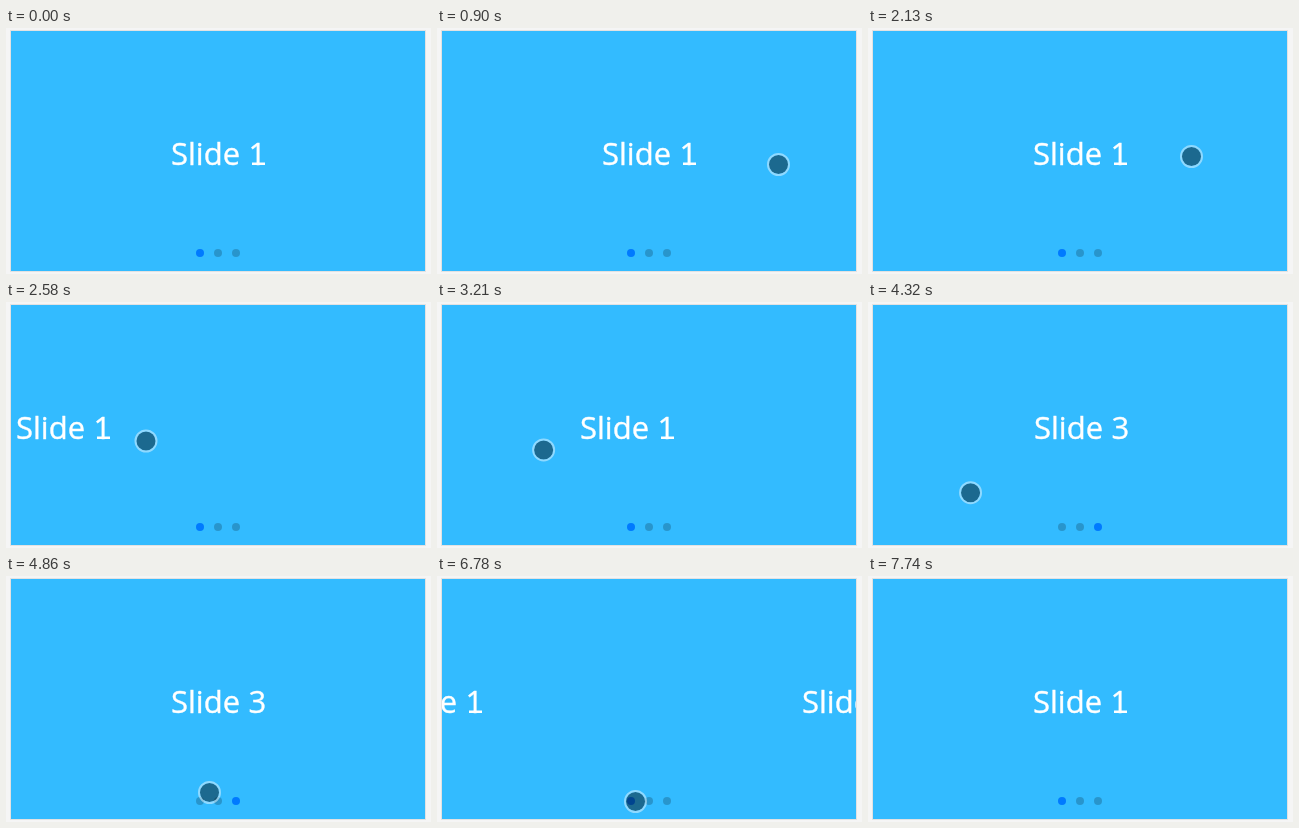
Write an HTML page with a canvas that moves like this. It is 425 by 246 pixels and loops after 8000 ms.

```html
<!DOCTYPE html>
<html lang="en">
<head>
<meta charset="utf-8">
<title>Slider</title>
<style>
  html, body { margin: 0; width: 100%; height: 100%; overflow: hidden; background: #f5f5f5; }
  canvas { display: block; }
</style>
</head>
<body>
<canvas id="stage" width="425" height="246"></canvas>
<script>
const ctx = document.getElementById('stage').getContext('2d');
const LOOP = 8000, STEP = 30;
const VIEW = { x: 5, y: 3, w: 414, h: 240 };
const SLIDES = 3;
const SNAP = 300;
const LAG = 91; // the page trails the pointer
const SHOW = 720, HIDE = 7740;
const CLICK = { begin: 6646.5, seen: 6720 };

const lerp = (a, b, p) => a + (b - a) * p;
const smooth = p => p * p * (3 - 2 * p);
const clamp = p => Math.max(0, Math.min(1, p));

// CSS "ease": cubic-bezier(.25, .1, .25, 1)
function ease(x) {
  if (x <= 0 || x >= 1) return clamp(x);
  const curve = (a, b, s) => 3 * a * s * (1 - s) ** 2 + 3 * b * s * s * (1 - s) + s ** 3;
  let lo = 0, hi = 1;
  for (let i = 0; i < 24; i++) {
    const mid = (lo + hi) / 2;
    if (curve(0.25, 0.25, mid) < x) lo = mid; else hi = mid;
  }
  return curve(0.1, 1, lo);
}

const glides = [];
const swipes = [];

function glide(start, end, x, y) {
  glides.push({ start, end, x, y });
}

// Drag to the left, let go, then bring the pointer back.
function swipe(press, length, reach, back, home, advance) {
  const end = press + length;
  const from = swipes.length ? swipes[swipes.length - 1].to : 0;
  glide(press, end, ...reach);
  glide(end + 60, back, ...home);
  swipes.push({ press, release: end + 30, from, to: from + advance });
}

glide(SHOW, 900, 341.5, 136.5);
glide(1680, 1860, 323.5, 128.5);
swipe(2130, 390, [140, 139], 2940, [337, 146.5], 0);
swipe(3090, 180, [26, 148.5], 3780, [313.5, 169.5], 1);
swipe(3840, 180, [40, 176], 4650, [203.5, 214.5], 1);
glide(4830, 4890, 203.5, 218.5);
glide(5040, 5340, 189.5, 225.5);
glide(6240, 6330, 198.5, 225.5);
glide(7230, 7710, 410.5, 24.5);

function pointer(t) {
  let x = 400.5, y = 98.5;
  for (const g of glides) {
    if (t <= g.start) break;
    const p = smooth(clamp((t - g.start) / (g.end - g.start)));
    x = lerp(x, g.x, p);
    y = lerp(y, g.y, p);
  }
  return { x, y };
}

function sliderState(t) {
  if (t >= CLICK.seen) {
    const p = ease((t - CLICK.begin) / SNAP);
    return { offset: (SLIDES - 1) * VIEW.w * (1 - p), active: 0 };
  }
  const s = swipes.findLast(s => t >= s.press);
  if (!s) return { offset: 0, active: 0 };
  const held = Math.max(s.press, Math.min(t, s.release) - LAG);
  const pan = s.from * VIEW.w + pointer(s.press).x - pointer(held).x;
  return {
    offset: lerp(pan, s.to * VIEW.w, ease((t - s.release) / SNAP)),
    active: t < s.release ? s.from : s.to
  };
}

function disc(x, y, r, fill) {
  ctx.fillStyle = fill;
  ctx.beginPath();
  ctx.arc(x, y, r, 0, Math.PI * 2);
  ctx.fill();
}

function box(fill, grow = 0) {
  ctx.fillStyle = fill;
  ctx.fillRect(VIEW.x - grow, VIEW.y - grow, VIEW.w + 2 * grow, VIEW.h + 2 * grow);
}

function write(text, x) {
  ctx.fillText(text, x, 137);
  ctx.strokeText(text, x, 137);
}

function drawLabel(number, dx) {
  ctx.fillStyle = ctx.strokeStyle = '#fff';
  ctx.lineWidth = 0.4;
  write('Slide', 165 + dx);
  write(number, 242.5 + dx);
  if (number === 1) ctx.fillRect(246 + dx, 134.5, 13, 2.5);
}

function drawPointer({ x, y }) {
  disc(x, y, 9.6, 'rgba(0,0,0,.44)');
  ctx.strokeStyle = 'rgba(255,255,255,.45)';
  ctx.lineWidth = 2;
  ctx.beginPath();
  ctx.arc(x, y, 10.5, 0, Math.PI * 2);
  ctx.stroke();
}

function draw(t) {
  const { offset, active } = sliderState(t);
  ctx.fillStyle = '#f5f5f5';
  ctx.fillRect(0, 0, 425, 246);
  box('#e2e2e2', 1);

  ctx.save();
  ctx.beginPath();
  ctx.rect(VIEW.x, VIEW.y, VIEW.w, VIEW.h);
  ctx.clip();
  box('#33bbff');
  ctx.font = '31px "Open Sans", "Noto Sans", sans-serif';
  for (let i = 0; i < SLIDES; i++) {
    drawLabel(i + 1, Math.round(i * VIEW.w - offset));
    disc(194 + 18 * i, 225, 4, i === active ? '#007aff' : 'rgba(0,0,0,.2)');
  }
  ctx.restore();

  if (t >= SHOW && t < HIDE) drawPointer(pointer(t));
}

let origin;
function tick(now) {
  origin ??= now;
  const t = (now - origin) % LOOP;
  draw(Math.floor(t / STEP) * STEP);
  requestAnimationFrame(tick);
}
draw(0);
requestAnimationFrame(tick);
</script>
</body>
</html>
```
